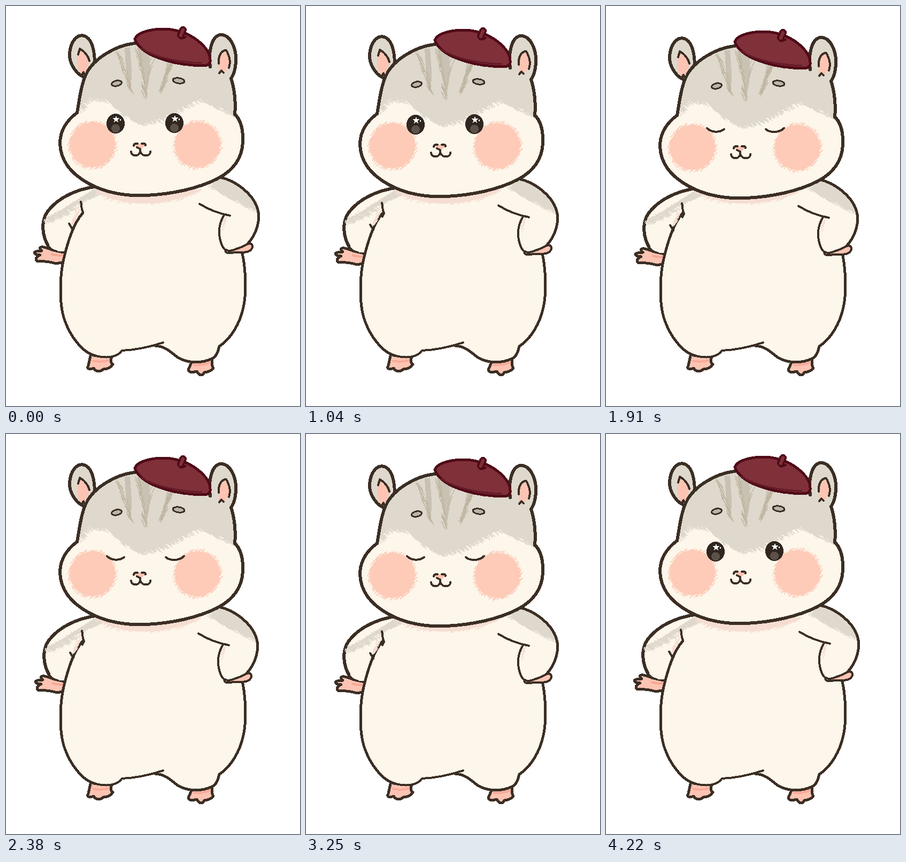
An HTML page for the animation above (4.29 s loop, 550 by 750 pixels).

```html
<!DOCTYPE html>
<html lang="en">
<head>
<meta charset="utf-8">
<title>Hamster in a beret</title>
<style>
  html, body { margin: 0; width: 100%; height: 100%; overflow: hidden; background: #fff; }
  svg { display: block; width: 100vw; height: 100vh; shape-rendering: crispEdges; }
  .ink { fill: none; stroke: #3b2e24; stroke-width: 6; stroke-linecap: round; stroke-linejoin: round; }
  .thin { stroke-width: 4; }
  .limb { stroke-width: 5; }
  .cream { fill: #fdf6ea; }
  .gray { fill: #ded8cd; }
  .pink { fill: #fdc4b3; }
  .brow { fill: #bbb4a8; stroke-width: 3; }
  .hatch { fill: none; stroke-linecap: round; }
</style>
</head>
<body>
<svg viewBox="0 0 550 750">
  <defs>
    <path id="skull" d="M240 70C205 74 165 98 150 127C140 150 138 172 133 200C113 215 101 235 101 258C102 290 122 315 155 333C185 350 225 357 262 355C310 353 360 342 395 324C425 309 442 285 443 255C444 230 438 212 428 203C430 182 428 158 421 135C412 108 385 85 350 75C310 62 270 65 240 70Z"/>
    <clipPath id="inHead"><use href="#skull"/></clipPath>
    <path id="sleeveL" d="M172 338C130 343 96 361 78 385C63 406 70 434 78 448C82 455 88 459 95 460L125 460L150 400L180 345Z"/>
    <clipPath id="inSleeveL"><path d="M185 339C130 343 96 361 78 385C64 402 70 436 78 448L120 440L142 370L185 350Z"/></clipPath>
    <path id="sleeveR" d="M370 330L400 321C430 327 461 352 470 378C478 402 467 430 452 446C444 454 436 460 424 460L411 458C408 456 404 452 402 445C396 425 399 405 413 392L362 371Z"/>
    <clipPath id="inSleeveR"><use href="#sleeveR"/></clipPath>
    <path id="star" d="M0-6.5L1.7-2.2L6.3-2L2.7.9L4 5.4L0 2.9L-4 5.4L-2.7.9L-6.3-2L-1.7-2.2Z" fill="#fff"/>
    <g id="eye">
      <ellipse rx="17" ry="18.5" fill="#30261f"/>
      <circle cy="9" r="8" fill="#5b5148"/>
      <use href="#star" x="1" y="-8"/>
      <circle cx="9" cy="-7" r="1.3" fill="#fff"/>
    </g>
  </defs>

  <g class="armL">
    <path class="ink limb pink" d="M114 463C104 461 96 460 89 458C82 456 76 453 70 452C62 451 62 455 67 459L57 460C51 461 52 465 58 466L64 467C55 470 54 477 60 479C70 478 78 479 86 481C94 484 103 482 114 478"/>
    <path d="M84 465Q95 469 106 467" fill="none" stroke="#f7a795" stroke-width="4"/>
    <use href="#sleeveL" class="cream"/>
    <path class="ink" d="M172 338C130 343 96 361 78 385C63 406 70 434 78 448"/>
    <path class="ink thin" d="M78 448C82 455 88 459 95 460"/>
  </g>

  <path class="ink limb pink" d="M158 656L154 674C150 681 157 682 164 679C168 686 176 687 182 681C190 681 197 677 200 672C194 668 196 662 199 655"/>
  <path class="ink limb pink" d="M348 666L341 682C342 688 350 687 357 685C362 694 368 694 371 687C380 686 385 683 388 679C383 672 386 665 385 658"/>
  <path d="M161 665Q178 669 194 664M350 673Q366 675 382 668" fill="none" stroke="#f9ab9a" stroke-width="4"/>

  <path class="cream" d="M175 340L140 368L142 389C128 405 115 440 108 470C100 505 99 560 110 590C120 618 142 650 168 656C185 661 205 660 217 645L270 637C293 637 300 643 315 654C330 668 360 673 386 661C394 657 396 648 398 638C420 625 438 595 444 565C450 540 449 490 441 455L430 380L390 335Z"/>
  <path class="ink limb" d="M143 389C128 405 116 440 109 470C100 505 99 560 110 590C120 618 142 650 168 656M441 460C449 490 450 540 444 565C438 595 420 625 399 638C397 648 394 657 386 661C360 673 330 668 315 654C303 644 294 638 279 637"/>
  <path class="ink thin" d="M168 656C188 661 208 659 217 646C240 645 270 639 294 631"/>

  <g class="armL">
    <g clip-path="url(#inSleeveL)">
      <path class="gray" d="M60 410L185 330L185 348L140 368L110 385L70 402Z"/>
      <path class="hatch" data-along="76 402 104 390 138 368 180 350" data-stroke="12 8 130 #ded8cd"/>
      <path class="hatch" data-along="137 380 127 405" data-stroke="-9 12 22 #f5dbd0"/>
    </g>
    <path class="ink thin" d="M140 367C142 374 140 379 144 387L141 393M118 408L124 418"/>
  </g>

  <g class="armR">
    <use href="#sleeveR" class="cream"/>
    <g clip-path="url(#inSleeveR)">
      <path class="gray" d="M385 325L410 310L490 360L480 387L455 378L425 358L388 340Z"/>
      <path class="hatch" data-along="384 338 422 358 470 384" data-stroke="12 8 130 #ded8cd"/>
      <path class="hatch" data-along="409 398 404 415" data-stroke="-5 9 14 #f5dbd0"/>
    </g>
    <path class="ink limb" d="M400 321C430 327 461 352 470 378C478 402 467 430 452 446"/>
    <path class="ink thin pink" d="M411 457C420 462 427 456 438 453L453 446C461 443 463 452 459 456C455 463 441 462 428 462C417 464 408 464 411 457Z"/>
    <path class="ink thin" d="M362 371C378 381 397 389 419 393M407 394C397 410 397 430 403 446C405 452 408 456 412 458"/>
  </g>

  <path d="M166 345Q205 371 262 370Q325 368 366 344Z" fill="#f6ddd2"/>
  <path class="hatch" data-along="168 347 205 363 262 368 320 362 362 347" data-stroke="-12 8 90 #f6ddd2"/>

  <g id="head">
    <path class="ink gray" d="M149 134C132 130 118 108 119 90C120 68 132 52 146 56C159 60 165 76 166 104Z"/>
    <use href="#skull" class="cream"/>
    <g clip-path="url(#inHead)">
      <path class="gray" d="M120 60H440V207L400 190L364 173L322 193L290 210L252 219L222 203L190 175L158 170L120 205Z"/>
      <path class="hatch" data-along="134 196 158 172 190 175 222 203 252 219" data-stroke="11 10 150 #ded8cd"/>
      <path class="hatch" data-along="252 219 290 211 322 193 364 173" data-stroke="12 10 130 #ded8cd"/>
      <path class="hatch" data-along="364 174 400 191 430 206" data-stroke="12 10 70 #ded8cd"/>
      <path d="M222 78L232 78L235 120L234 158L225 128ZM246 78L268 80L270 120L261 179L256 130ZM302 100L313 104L301 136L290 163Z" fill="#c9c2b4"/>
      <path class="hatch" data-along="210 90 224 125 234 160" data-stroke="8 14 36 #bfb49e"/>
      <path class="hatch" data-along="247 82 254 120 260 170" data-stroke="7 15 36 #bfb49e"/>
      <path class="hatch" data-along="276 95 267 130 262 160" data-stroke="-7 14 22 #c5bcaa"/>
      <path class="hatch" data-along="310 106 299 135 289 160" data-stroke="-9 13 36 #bfb49e"/>
    </g>
    <g id="blush" fill="#fdcbb8"></g>
    <use href="#skull" class="ink"/>

    <path class="pink" d="M137 82C150 85 157 96 156 104L148 127L141 128C131 115 130 95 137 82Z"/>
    <path class="ink thin" d="M135 91L138 80C148 86 154 94 156 103M141 131L145 124L148 130L152 125"/>
    <path class="ink gray" d="M382 114C378 85 385 55 402 54C420 54 432 80 430 105C429 120 426 129 421 136"/>
    <path class="pink" d="M412 83C402 84 397 98 398 122L409 123L417 113C420 103 417 92 412 83Z"/>
    <path class="ink thin" d="M398 108C397 94 402 83 412 83C418 94 421 104 417 116M399 126L403 121L407 125"/>

    <ellipse class="ink brow" cx="207" cy="145" rx="9.5" ry="5" transform="rotate(-12 207 145)"/>
    <ellipse class="ink brow" cx="323" cy="140" rx="11" ry="5" transform="rotate(8 323 140)"/>
    <g id="open">
      <use href="#eye" x="205" y="220.500"/>
      <use href="#eye" x="315" y="219.500"/>
    </g>
    <path class="pink" d="M240 260Q250 255 261 260Q256 268 250 268Q244 266 240 260Z"/>
    <path class="ink thin" d="M239 262Q240 257 246 258M254 258Q261 257 261 261M245 265L251 268V273C249 283 235 283 234 273M251 273C255 283 270 283 270 273"/>
  </g>
  <path id="closed" class="ink thin" d="M189 229C196 237 212 238 221 231M299 231C307 238 324 238 333 229"/>

  <g id="hat" stroke="#500a18" stroke-linecap="round">
    <path d="M241 62C247 47 280 41 308 44C347 49 384 78 382 104C381 114 368 112 350 111C308 108 251 92 241 62Z" fill="#7f3039" stroke-width="5"/>
    <path d="M252 79C280 97 320 105 366 107" fill="none" stroke="#641b27" stroke-width="3"/>
    <path d="M325 60Q330 62 336 58" fill="none" stroke-width="4"/>
    <path d="M327 54L331 45" fill="none" stroke-width="14"/>
    <path d="M327 55L331 45" fill="none" stroke="#7f3039" stroke-width="6"/>
  </g>
</svg>
<script>
const LOOP = 4290;
const $ = id => document.getElementById(id);

let seed = 7;
const random = () => (seed = seed * 16807 % 2147483647) / 2147483647;
const spread = size => (random() - .5) * size;

// Pencil strokes scattered along a polyline.
for (const path of document.querySelectorAll('[data-along]')) {
  const p = path.dataset.along.split(' ').map(Number);
  const [dx, dy, count, color] = path.dataset.stroke.split(' ');
  let d = '';
  for (let i = 0; i < count; i++) {
    const at = i / count * (p.length / 2 - 1), k = Math.floor(at) * 2, f = at % 1;
    const x = p[k] + (p[k + 2] - p[k]) * f + spread(7);
    const y = p[k + 1] + (p[k + 3] - p[k + 1]) * f + spread(7);
    const size = .4 + random() * .6;
    d += `M${x - dx * size / 2} ${y - dy * size / 2}l${dx * size} ${dy * size}`;
  }
  path.setAttribute('d', d);
  path.setAttribute('stroke', color);
  path.setAttribute('stroke-width', 1.3);
}

function blush(cx, cy, r) {
  let d = '';
  for (let i = 0; i < 150; i++) {
    const a = i / 150 * Math.PI * 2, edge = r + spread(6), size = 3 + random() * 5;
    d += `M${cx + edge * Math.cos(a) - size / 2} ${cy + edge * Math.sin(a) + size / 2}l${size} ${-size}`;
  }
  return `<circle cx="${cx}" cy="${cy}" r="${r}"/><path d="${d}" stroke="#fdcbb8" stroke-width="1.2"/>`;
}
$('blush').innerHTML = blush(162, 260, 42) + blush(358, 260, 42);

// Offsets: head y, left arm x and y, right arm x and y.
const poses = {
  up: [0, 0, 0, 0, 0],
  high: [2, 2, 2, -2, 3],
  low: [5, 2, 3, -2, 4],
  down: [7, -2, 3, 0, 5]
};

// Start time, pose, eyes shut, extra hat offset.
const steps = [
  [0, 'up'], [230, 'high'], [400, 'low'], [570, 'down'], [870, 'low'], [1040, 'high'], [1210, 'up'],
  [1540, 'high'], [1640, 'high', 1], [1910, 'low', 1], [2140, 'down', 1], [2210, 'low', 1],
  [2380, 'high', 1], [2550, 'up', 1], [2880, 'up'], [2950, 'high'], [3080, 'high', 1],
  [3250, 'low', 1], [3480, 'down', 1], [3550, 'low', 1, -1], [3720, 'high', 1, -2],
  [3890, 'up', 1], [4220, 'up']
];

const move = (el, x, y) => el.setAttribute('transform', `translate(${x} ${y})`);
const show = (el, on) => el.setAttribute('visibility', on ? 'visible' : 'hidden');
const armsL = document.querySelectorAll('.armL');
const armR = document.querySelector('.armR');

function draw(now) {
  const time = now % LOOP;
  const [, pose, shut = 0, hatShift = 0] = steps.findLast(step => step[0] <= time);
  const [y, lx, ly, rx, ry] = poses[pose];
  move($('head'), 0, y);
  move($('hat'), 0, y + hatShift);
  armsL.forEach(arm => move(arm, lx, ly));
  move(armR, rx, ry);
  show($('open'), !shut);
  show($('closed'), shut);
}

const start = performance.now();
function tick() {
  draw(performance.now() - start);
  requestAnimationFrame(tick);
}
tick();
</script>
</body>
</html>
```
